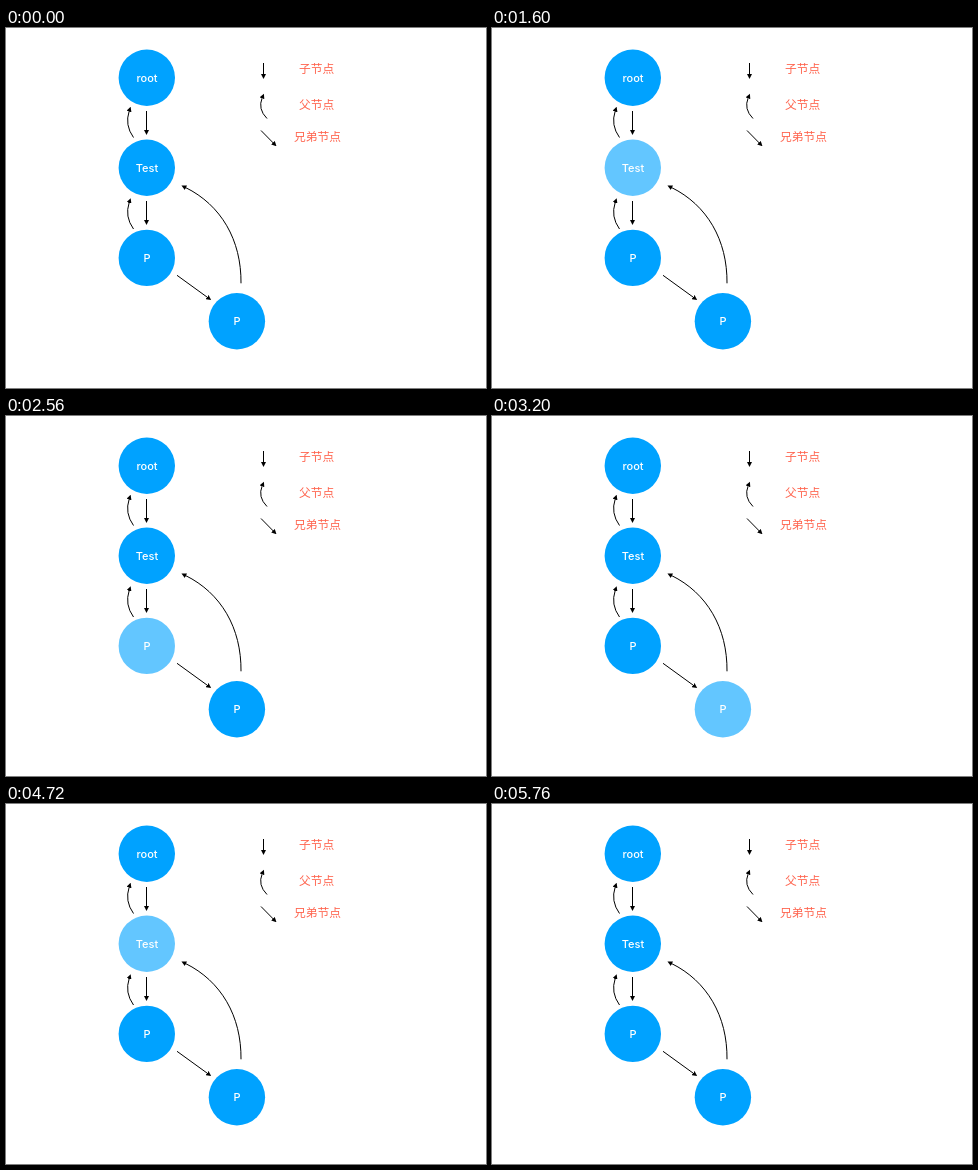
Animation, 480 px wide and 360 px high, one loop 6.28 s. Source, as an HTML page:

```html
<!DOCTYPE html>
<html lang="zh">
<head>
<meta charset="utf-8">
<title>Tree traversal</title>
<style>
  html, body { margin: 0; width: 100%; height: 100%; overflow: hidden; background: #fff; }
  svg { display: block; width: 480px; height: 360px; }
  text { text-anchor: middle; }
  .node { fill: #00a2ff; }
  .label { fill: #fff; font: 500 11px Inter, "Liberation Sans", sans-serif; }
  .legend { fill: #ff644e; font: 500 11.75px "Noto Sans CJK SC", "Noto Sans CJK", sans-serif; }
  .arrow { fill: none; stroke: #000; stroke-width: 1; marker-end: url(#head); }
</style>
</head>
<body>
<svg viewBox="0 0 480 360">
  <defs>
    <marker id="head" markerUnits="userSpaceOnUse" markerWidth="5" markerHeight="5"
            refX="0.5" refY="2.5" orient="auto">
      <path d="M0 0L5 2.5L0 5z"/>
    </marker>
  </defs>

  <g class="node">
    <circle id="root" cx="140.8" cy="49.8" r="28.2"/>
    <circle id="test" cx="140.8" cy="139.8" r="28.2"/>
    <circle id="first" cx="140.8" cy="229.9" r="28.2"/>
    <circle id="second" cx="230.9" cy="293.2" r="28.2"/>
  </g>
  <g class="label">
    <text x="141" y="54">root</text>
    <text x="141" y="144">Test</text>
    <text x="141" y="234">P</text>
    <text x="231" y="297">P</text>
  </g>

  <g class="arrow-set">
    <path class="arrow" d="M140.5 83V102.5"/>
    <path class="arrow" d="M140.5 173V192.5"/>
    <path class="arrow" d="M127.5 109.5Q118.5 97 123.2 83"/>
    <path class="arrow" d="M127.5 201Q118.5 188.5 123.2 174.5"/>
    <path class="arrow" d="M171 247.3L201.5 269.4"/>
    <path class="arrow" d="M235 255.3C235.5 212 215 177 179.5 159.5"/>
    <path class="arrow" d="M257.5 35V46.5"/>
    <path class="arrow" d="M261 90.5Q251.5 81 256.2 69.8"/>
    <path class="arrow" d="M255 102.5L267.3 115"/>
  </g>
  <g class="legend">
    <text x="310.7" y="45.3">子节点</text>
    <text x="310.7" y="81.2">父节点</text>
    <text x="311.5" y="113.3">兄弟节点</text>
  </g>
</svg>
<script>
  const LOOP = 6280, TURN = 960, BLINK = 240, TICK = 40, FADE = 0.52;
  const nodes = [...document.querySelectorAll('circle')];
  const order = ['root', 'test', 'first', 'second', 'test', 'root'];

  // Each visited node blinks four times during its turn.
  function draw(now) {
    const t = Math.floor((now % LOOP) / TICK) * TICK;
    const active = order[Math.floor(t / TURN)];
    const dim = FADE * Math.sin(Math.PI * t / BLINK) ** 2;
    for (const node of nodes) {
      node.style.opacity = node.id === active ? 1 - dim : 1;
    }
  }

  const start = performance.now();
  function loop() {
    draw(performance.now() - start);
    requestAnimationFrame(loop);
  }
  loop();
</script>
</body>
</html>
```
